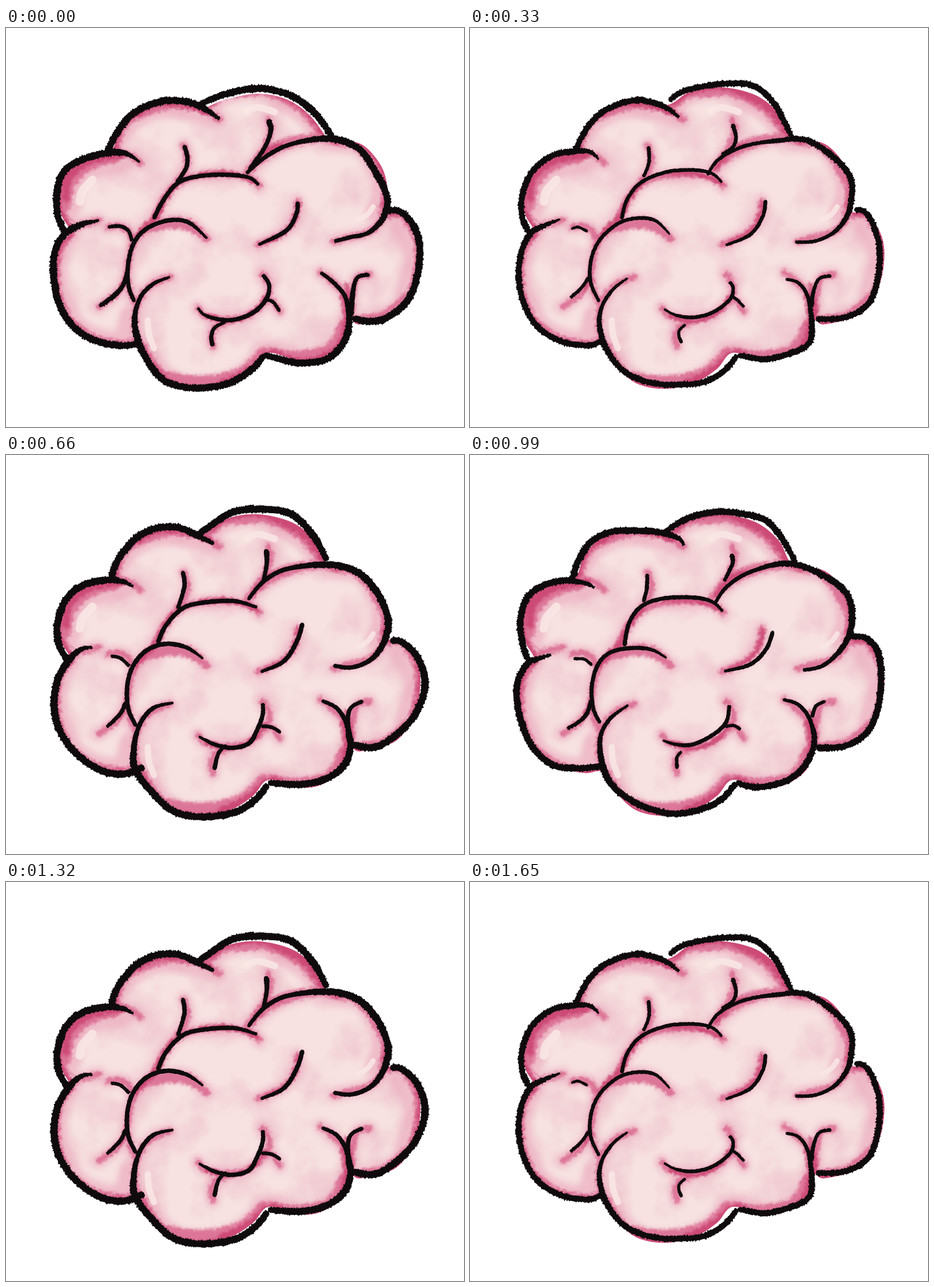
An HTML page for the animation above (1980 ms loop, 801x699 px).

```html
<!DOCTYPE html>
<html lang="en">
<head>
<meta charset="utf-8">
<title>Brain</title>
<style>
  html, body { margin: 0; width: 100%; height: 100%; overflow: hidden; background: #fff; }
  svg { display: block; width: 100vw; height: 100vh; }
  .shade path, .shine path { fill: none; stroke-linecap: round; stroke-linejoin: round; }
  .wash { stroke: #eaa6bb; }
  .mid { stroke: #d8648c; }
  .deep { stroke: #c73c6a; }
  .shine { stroke: #f9e8e6; }
</style>
</head>
<body>
<svg viewBox="0 0 801 699" xmlns="http://www.w3.org/2000/svg">
  <defs>
    <clipPath id="bodyClip"><path id="bodyShape"/></clipPath>
    <filter id="soft" filterUnits="userSpaceOnUse" x="0" y="0" width="801" height="699" color-interpolation-filters="sRGB">
      <feGaussianBlur stdDeviation="6"/>
    </filter>
    <filter id="brush" filterUnits="userSpaceOnUse" x="0" y="0" width="801" height="699" color-interpolation-filters="sRGB">
      <feGaussianBlur stdDeviation="2.2" result="b"/>
      <feTurbulence type="fractalNoise" baseFrequency=".13" numOctaves="2" seed="4"/>
      <feDisplacementMap in="b" scale="9" xChannelSelector="R" yChannelSelector="G"/>
    </filter>
    <filter id="mottle" filterUnits="userSpaceOnUse" x="0" y="0" width="801" height="699" color-interpolation-filters="sRGB">
      <feTurbulence type="fractalNoise" baseFrequency=".014" numOctaves="4" seed="9"/>
      <feColorMatrix values="0 0 0 0 .92  0 0 0 0 .72  0 0 0 0 .77  1.4 0 0 0 -.62"/>
    </filter>
  </defs>
  <g clip-path="url(#bodyClip)">
    <rect width="801" height="699" fill="#f7e2e1"/>
    <rect width="801" height="699" filter="url(#mottle)"/>
    <g class="shade wash" id="wash" filter="url(#soft)" opacity=".62"/>
    <g class="shade mid" id="mid" filter="url(#brush)" opacity=".8"/>
    <g class="shade deep" id="deep" filter="url(#brush)" opacity=".75"/>
    <g class="shine" id="shine"/>
  </g>
  <g id="ink" fill="#0f0b0d"></g>
</svg>
<script>
const $ = id => document.getElementById(id);
const clamp = v => Math.max(0, Math.min(1, v));

function add(parent, tag, attrs = {}) {
  const el = document.createElementNS('http://www.w3.org/2000/svg', tag);
  for (const key in attrs) el.setAttribute(key, attrs[key]);
  return parent.appendChild(el);
}

let seed = 17;
function random() {
  seed = (seed * 16807) % 2147483647;
  return seed / 2147483647;
}

// Smooth curve through "x,y x,y ..." points.
function curve(text, closed = false) {
  const p = text.split(' ').map(s => s.split(',').map(Number));
  const n = p.length;
  const at = i => p[closed ? (i + n) % n : Math.max(0, Math.min(n - 1, i))];
  let d = 'M' + p[0];
  for (let i = 0; i < n - (closed ? 0 : 1); i++) {
    const [a, b, c, e] = [at(i - 1), at(i), at(i + 1), at(i + 2)];
    const c1 = [0, 1].map(k => (b[k] + (c[k] - a[k]) / 6).toFixed(1));
    const c2 = [0, 1].map(k => (c[k] - (e[k] - b[k]) / 6).toFixed(1));
    d += `C${c1} ${c2} ${c}`;
  }
  return closed ? d + 'Z' : d;
}

const shade = (layer, width, points) =>
  add($(layer), 'path', { d: curve(points), 'stroke-width': width });

// Bristly pen line: heavier and hairier towards the rim of the brain.
function penLine(text, headWidth, tailWidth, weight) {
  const path = document.createElementNS('http://www.w3.org/2000/svg', 'path');
  path.setAttribute('d', curve(text));
  const length = path.getTotalLength();
  const left = [], right = [];
  for (let s = 0; s <= length; s += 1.3) {
    const q = path.getPointAtLength(s);
    const a = path.getPointAtLength(Math.max(0, s - 1));
    const b = path.getPointAtLength(Math.min(length, s + 1));
    const size = Math.hypot(b.x - a.x, b.y - a.y) || 1;
    const nx = (a.y - b.y) / size, ny = (b.x - a.x) / size;
    const rim = clamp((Math.hypot((q.x - 405) / 320, (q.y - 368) / 265) - .7) / .16);
    const grow = (edge, w) => w + (1 - w) * clamp(edge / 45);
    let half = (3.8 + 1.4 * rim) * weight * grow(s, headWidth) * grow(length - s, tailWidth);
    half *= Math.sqrt(clamp((Math.min(s, length - s) + .6) / half));
    const hair = () => half - .5 + (.9 + .6 * rim) * random() + 2.4 * rim * random() ** 3;
    const l = hair(), r = hair();
    left.push(`${(q.x + nx * l).toFixed(1)},${(q.y + ny * l).toFixed(1)}`);
    right.unshift(`${(q.x - nx * r).toFixed(1)},${(q.y - ny * r).toFixed(1)}`);
  }
  return 'M' + left.concat(right).join('L') + 'Z';
}

const weights = [1.04, .88, 1.06, .97];
const poses = weights.map(() => add($('ink'), 'g', { visibility: 'hidden' }));

function ink(head, tail, ...variants) {
  variants.forEach((points, i) =>
    add(poses[i], 'path', { d: penLine(points, head, tail, weights[i]) }));
  shade('wash', 24, variants[0]);
  shade('mid', 11, variants[0]);
}

// Body colour and rim shading
const body = curve('183,215 200,176 235,142 290,128 345,135 385,112 440,104 500,118 540,150 565,192 620,203 655,240 667,280 665,320 695,326 720,365 724,410 712,460 680,502 620,519 602,513 588,552 550,578 510,582 459,569 432,597 392,622 340,632 290,622 255,590 232,555 200,557 150,545 108,510 90,470 85,420 95,380 112,357 98,330 91,300 100,260 130,230', true);
$('bodyShape').setAttribute('d', body);
[['wash', 42], ['mid', 20], ['deep', 9]].forEach(([layer, w]) =>
  add($(layer), 'path', { d: body, 'stroke-width': w }));

// Broader shadows
shade('wash', 46, '110,310 115,270 145,244 200,232');
shade('wash', 30, '200,190 235,155 290,143 360,155');
shade('wash', 34, '475,125 520,150 545,180');
shade('wash', 30, '100,470 130,525 195,545 215,500');
shade('wash', 26, '640,235 652,280 640,325');
shade('wash', 24, '680,350 708,400 690,470');
shade('mid', 24, '102,310 112,268 145,238 190,224');
shade('mid', 12, '230,155 290,136 345,144 370,160');
shade('mid', 18, '400,113 460,112 520,144 556,190');
shade('mid', 15, '445,222 490,200 555,190');
shade('mid', 14, '248,352 290,345 325,351 348,366');
shade('mid', 26, '268,612 340,622 410,608 452,572');
shade('mid', 22, '462,576 520,576 570,560 594,515');
shade('mid', 15, '612,512 660,503 700,472');
shade('mid', 14, '657,245 666,285 658,325');
shade('deep', 12, '104,300 110,262 150,232 205,222');
shade('deep', 10, '225,155 255,136 300,132 355,148');
shade('deep', 12, '465,110 520,138 560,188');
shade('deep', 11, '228,366 248,344 266,328 278,298 302,270');
shade('deep', 8, '340,255 390,254 440,272');
shade('deep', 8, '430,245 455,216 480,205');
shade('deep', 15, '380,622 420,605 455,574');
shade('deep', 13, '545,580 582,560 597,510 590,470');
shade('deep', 7, '350,504 390,514 432,499 452,472');
shade('deep', 6, '513,305 507,330 488,358 455,376');
shade('deep', 8, '595,450 602,480 603,512');
shade('deep', 6, '211,430 200,458');

// Glossy highlights
const shine = (w, points) => add($('shine'), 'path', { d: curve(points), 'stroke-width': w, opacity: .85 });
shine(12, '420,146 441,139 470,147');
shine(15, '151,266 134,285 129,304');
shine(11, '248,512 250,537 259,561');
shine(9, '642,313 633,326 618,335');

// Uncoloured sliver under the first pose's crown
add(poses[0], 'path', {
  d: curve('345,132 380,117 440,106 495,117 538,147 570,190'),
  fill: 'none', stroke: '#fff', 'stroke-width': 18
});

// Crown
ink(.8, .8, '335,136 380,117 440,106 495,117 538,147 572,192',
  '348,128 375,110 440,98 495,101 530,130 550,165 564,193',
  '330,144 370,115 400,99 440,95 495,102 535,138 562,186',
  '340,136 380,111 430,100 475,103 518,115 548,150 570,190');
// Upper left lobe
ink(.9, .5, '176,220 195,182 225,148 270,129 310,128 345,140 374,160',
  '183,216 205,175 235,145 285,127 325,132 350,144 366,157',
  '184,216 195,185 225,148 260,129 300,127 335,141 364,156',
  '178,220 190,185 212,152 250,134 300,133 340,137 366,147 374,159');
// Left lobe
ink(.9, .4, '104,360 91,330 89,290 100,253 130,232 176,219 210,220 235,236',
  '104,360 91,330 92,290 110,250 145,223 185,216 210,217 226,231',
  '108,362 92,330 90,295 105,253 135,228 175,219 205,222 223,231',
  '102,360 92,330 88,290 100,250 130,228 165,220 200,224 219,233');
// Lower left lobe
ink(.4, .9, '163,337 130,345 102,362 86,390 83,430 92,480 115,520 150,545 195,556 232,554',
  '158,335 130,346 106,360 90,392 85,435 95,485 120,525 160,549 205,556 236,546',
  '151,336 128,342 108,362 90,395 84,440 95,485 125,525 165,552 205,559 243,546',
  '142,350 115,358 100,366 84,395 82,430 92,475 112,515 145,543 190,549 235,544');
// Left creases
ink(.8, .8, '178,349 198,347 214,355 221,375', '177,352 190,349 206,357',
  '183,352 200,356 217,371', '181,357 200,358 214,369');
ink(1, .5, '213,425 205,450 190,468 163,488', '208,436 195,455 175,473',
  '210,432 200,453 176,477', '212,428 205,452 190,468 169,480');
// Inner left lobe
ink(.9, .5, '225,480 215,455 213,420 222,380 245,352 285,337 320,341 352,369',
  '226,480 211,445 212,405 228,370 260,342 295,333 325,338 350,362',
  '228,476 214,445 212,405 222,370 245,343 278,331 315,337 345,357',
  '228,470 216,445 213,405 225,365 250,344 290,338 320,342 344,356');
// Right lobe and its crease
ink(.9, 1, '664,320 690,322 715,350 724,390 718,440 700,480 665,508 635,514 605,508',
  '672,318 690,322 705,345 716,385 713,440 695,485 655,507 605,510',
  '672,325 693,328 720,355 733,400 718,450 685,488 645,512 605,507',
  '665,318 690,320 712,342 719,385 714,440 695,485 655,510 605,513');
ink(.8, 1, '636,432 615,437 607,460 603,505', '632,434 610,440 600,465 597,490',
  '625,431 605,441 598,460 600,500', '622,431 605,440 598,460');
// Bottom right lobe
ink(.8, 1, '550,428 575,448 595,475 600,520 588,555 560,580 515,587 480,580 450,572',
  '552,440 575,447 592,475 598,530 590,555 560,570 515,580 468,573',
  '552,430 580,445 597,475 602,515 590,545 560,567 515,577 458,574',
  '547,428 575,438 595,465 602,505 585,545 550,572 500,582 464,573');
// Large right lobe
ink(.8, .9, '420,255 455,225 500,203 565,194 615,210 645,250 666,295 661,330 635,358 600,367 573,374',
  '415,258 435,230 480,207 540,197 590,197 640,230 667,268 663,320 640,355 605,373 568,375',
  '423,254 450,222 490,200 560,192 610,203 645,235 668,285 662,325 640,357 605,372 572,369',
  '428,260 450,230 490,205 550,190 600,202 650,233 667,265 665,310 645,345 615,370 581,377');
// Upper creases
ink(1, .9, '459,160 463,180 452,210 425,248', '459,168 465,190 460,208 440,222',
  '455,165 456,190 450,222', '457,173 459,190 444,222');
ink(1, .9, '311,205 317,225 315,245 298,272', '312,207 313,235 303,262',
  '309,203 312,230 300,270', '310,208 309,235 303,258');
// Central lobe
ink(1, .7, '258,335 275,302 300,272 335,260 385,257 425,262 443,276',
  '265,335 275,300 300,270 345,252 395,249 425,256 441,271',
  '265,330 280,298 310,268 350,258 400,256 440,267',
  '270,335 278,295 300,265 340,251 395,250 425,258 443,275');
ink(1, .7, '510,304 508,325 490,355 441,380', '517,301 512,330 490,362 446,381',
  '519,294 508,328 485,362 445,380', '530,308 518,340 490,367 444,379');
// Smile-shaped crease with two branches
ink(.6, .9, '335,490 350,504 390,512 430,500 455,475 460,450 448,431',
  '339,492 360,503 390,507 425,498 455,475 460,455 453,444',
  '337,493 365,507 395,513 425,505 440,480 449,455 449,434',
  '337,500 360,507 390,507 425,490 448,468 454,437');
ink(.9, .8, '455,475 468,481 479,497', '455,468 468,477 480,490',
  '446,475 465,477 481,487', '446,476 462,474 474,482');
ink(.7, 1, '384,515 365,525 359,542 362,558', '377,519 366,530 366,542 371,552',
  '386,508 372,522 364,552', '370,519 362,530 362,550');
// Bottom lobe
ink(.6, 1, '287,436 258,448 235,472 225,510 232,550 255,595 285,622 335,631 390,622 430,598 452,572',
  '276,438 250,458 230,490 227,525 240,565 270,602 315,621 365,625 410,620 445,600 468,572',
  '293,434 258,443 235,470 224,510 226,550 255,590 295,625 350,634 405,624 440,600 458,576',
  '277,438 245,462 228,495 231,540 250,580 295,612 350,628 400,622 440,603 466,574');

const order = [0, 1, 2, 3, 2, 1];
const hold = 330;
let start = null;

function render(now) {
  if (start === null) start = now;
  const current = order[Math.floor((now - start) / hold) % order.length];
  poses.forEach((pose, i) => pose.setAttribute('visibility', i === current ? 'visible' : 'hidden'));
  requestAnimationFrame(render);
}
requestAnimationFrame(render);
</script>
</body>
</html>
```
